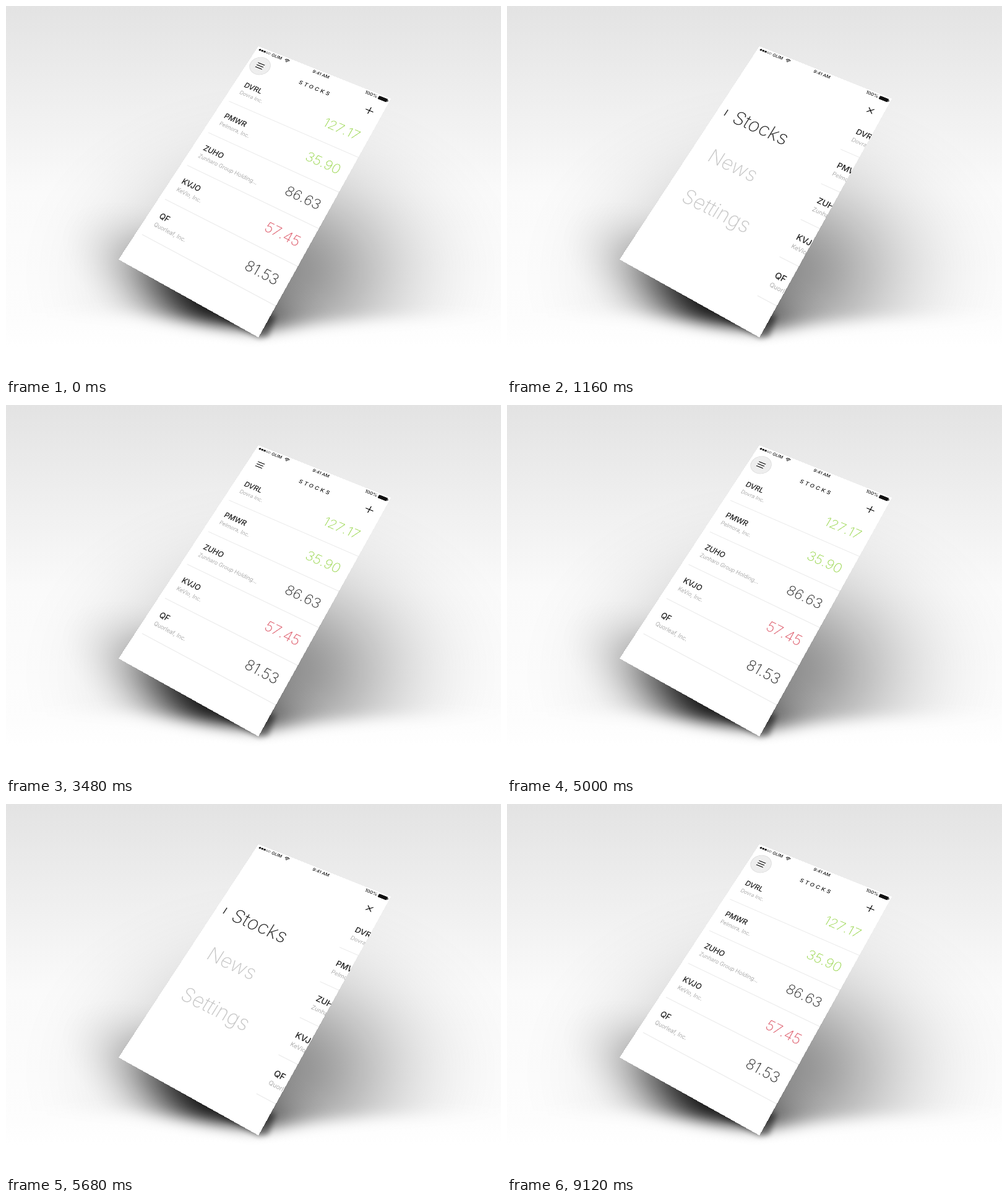
Write an HTML page that moves like this. It is 800x600 px and loops after 9200 ms.

```html
<!DOCTYPE html>
<html lang="en">
<head>
<meta charset="utf-8">
<title>Stocks menu</title>
<style>
  html, body { margin: 0; width: 100%; height: 100%; overflow: hidden; background: #fff; }
  #stage { position: relative; width: 800px; height: 600px; overflow: hidden; }
  #stage > svg { position: absolute; left: 0; top: 0; }
  #card { position: absolute; left: 0; top: 0; width: 375px; height: 667px; overflow: hidden;
          background: #fff; transform-origin: 0 0; }
  #card svg { display: block; font-family: Inter, "Open Sans", sans-serif; fill: #111; }
  .status { font-size: 12px; font-weight: 500; }
  .title { font-size: 15px; font-weight: 500; letter-spacing: 4.8px; }
  .ticker { font-size: 19.5px; font-weight: 500; fill: #1a1a1a; }
  .company { font-size: 14px; font-weight: 400; fill: #aaa; }
  .price { font-size: 34px; font-weight: 200; font-kerning: none; text-anchor: end; }
  .menu { font-size: 50px; font-weight: 200; }
  .rule { stroke: #e9e9e9; stroke-width: 1.5; }
  .icon { stroke: #111; stroke-width: 2; fill: none; }
  .press { fill: #eee; stroke: #dcdcdc; stroke-width: 1.5; }
</style>
</head>
<body>
<div id="stage">
  <svg width="800" height="600">
    <defs>
      <linearGradient id="wall" x2="0" y2="1">
        <stop offset="0" stop-color="#e3e3e3"/>
        <stop offset=".17" stop-color="#ebebeb"/>
        <stop offset=".33" stop-color="#f2f2f2"/>
        <stop offset=".5" stop-color="#fafafa"/>
        <stop offset=".86" stop-color="#fdfdfd"/>
        <stop offset=".92" stop-color="#fff"/>
      </linearGradient>
      <radialGradient id="blob"></radialGradient>
      <filter id="soft" x="-50%" y="-50%" width="200%" height="200%"><feGaussianBlur stdDeviation="11"/></filter>
      <filter id="crisp" x="-50%" y="-50%" width="200%" height="200%"><feGaussianBlur stdDeviation="4"/></filter>
      <mask id="floor" maskUnits="userSpaceOnUse" x="0" y="0" width="800" height="600">
        <path d="M-50 -50H850V498L600 506 500 514 408 527 300 514 200 500 -50 494Z" fill="#fff" filter="url(#soft)"/>
      </mask>
    </defs>
    <rect width="800" height="600" fill="url(#wall)"/>
    <g mask="url(#floor)" fill="url(#blob)">
      <ellipse cx="430" cy="430" rx="411" ry="309" opacity=".44"/>
      <ellipse rx="270" ry="114" opacity=".85" transform="translate(330 480) rotate(29)"/>
    </g>
    <path d="M340 502L409 537 424 534 436 500Z" opacity=".45" filter="url(#crisp)"/>
  </svg>

  <div id="card">
    <svg width="375" height="667">
      <g id="list"></g>
      <g id="menu" class="menu">
        <rect x="22.5" y="205" width="2.2" height="19"/>
        <text x="48" y="232" fill="#222">Stocks</text>
        <text x="48" y="353" fill="#c6c6c6">News</text>
        <text x="48" y="474" fill="#c6c6c6">Settings</text>
      </g>

      <circle id="menuPress" class="press" cx="34.5" cy="53" r="27"/>
      <g id="header">
        <path class="icon" d="M24.5 46h20m-20 7h20m-20 7h20"/>
        <text class="title" x="149" y="58.5">STOCKS</text>
      </g>
      <circle id="plusPress" class="press" cx="343" cy="53" r="27"/>
      <path id="plus" class="icon" d="M333 53h20m-10 -10v20"/>

      <g class="status">
        <g id="signal"></g>
        <text x="45" y="13">GLIM</text>
        <g fill="none" stroke="#111" stroke-width="1.8">
          <path d="M83.5 7.5Q90 1.5 96.5 7.5M86 10.2Q90 6.5 94 10.2"/>
        </g>
        <path d="M87.8 11.8Q90 10 92.2 11.8L90 14Z"/>
        <text x="188" y="13.5" text-anchor="middle">9:41 AM</text>
        <text x="343" y="13.5" text-anchor="end">100%</text>
        <rect x="346" y="4" width="23.5" height="10" rx="2"/>
        <rect x="370" y="7" width="2" height="4" rx="1"/>
      </g>
    </svg>
  </div>
</div>

<script>
const LOOP = 9200, WIDTH = 375, HEIGHT = 667;
const LIST_SHIFT = 311, MENU_SHIFT = 260;
const GREEN = '#98d64c', RED = '#dc5565', DARK = '#222';
const el = id => document.getElementById(id);

// Gaussian falloff that reaches three sigma at the rim.
el('blob').innerHTML = Array.from({ length: 21 }, (_, i) => {
  const r = i / 20, alpha = Math.exp(-4.5 * r * r) - r * Math.exp(-4.5);
  return `<stop offset="${r}" stop-opacity="${alpha.toFixed(4)}"/>`;
}).join('');

const stocks = [
  ['DVRL', 'Dovra Inc.', '127.17', GREEN],
  ['PMWR', 'Pelmora, Inc.', '35.90', GREEN],
  ['ZUHO', 'Zunharo Group Holding...', '86.63', DARK],
  ['KVJO', 'KeVio, Inc.', '57.45', RED],
  ['QF', 'Quorleaf, Inc.', '81.53', DARK],
];
el('list').innerHTML = stocks.map(([ticker, company, price, color], i) => {
  const y = 181 + 102 * i;
  return `<text class="ticker" x="27" y="${y - 54}">${ticker}</text>
    <text class="company" x="27" y="${y - 31}">${company}</text>
    <text class="price" x="352" y="${y - 39.5}" fill="${color}">${price}</text>
    <path class="rule" d="M15 ${y}H375"/>`;
}).join('');

el('signal').innerHTML = [0, 1, 2, 3, 4].map(i =>
  `<circle cx="${9.5 + 7 * i}" cy="8.5" r="2.6" stroke="#111" stroke-width=".8"
    fill="${i < 3 ? '#111' : 'none'}"/>`).join('');

// Perspective matrix that maps a w x h box to four corners (clockwise from top left).
function quadMatrix(w, h, [[x0, y0], [x1, y1], [x2, y2], [x3, y3]]) {
  const ax = x1 - x2, bx = x3 - x2, sx = x0 - x1 + x2 - x3;
  const ay = y1 - y2, by = y3 - y2, sy = y0 - y1 + y2 - y3;
  const det = ax * by - bx * ay;
  const g = (sx * by - sy * bx) / det, k = (ax * sy - ay * sx) / det;
  return `matrix3d(${[
    (x1 - x0 + g * x1) / w, (y1 - y0 + g * y1) / w, 0, g / w,
    (x3 - x0 + k * x3) / h, (y3 - y0 + k * y3) / h, 0, k / h,
    0, 0, 1, 0,
    x0, y0, 0, 1].map(n => n.toFixed(9))})`;
}
el('card').style.transform =
  quadMatrix(WIDTH, HEIGHT, [[408, 65], [622, 150], [408, 536], [182, 410]]);

const clamp = x => Math.min(1, Math.max(0, x));
const easeIn = x => clamp(x) ** 3;
const easeOut = x => 1 - (1 - clamp(x)) ** 3;
const pulse = (t, from, to, rise = 160) =>
  Math.min(clamp((t - from) / rise), clamp(1 - (t - to) / 160));

function draw(t) {
  const [openAt, closeAt] = t < 4400 ? [540, 2800] : [5000, 7320];
  const open = easeOut((t - openAt) / 660) - easeOut((t - closeAt - 200) / 440);
  const menuAway = 1 - easeOut((t - openAt - 350) / 280) + easeIn((t - closeAt) / 370);
  const wrapped = t > 8500 ? t - LOOP : t;

  el('list').setAttribute('transform', `translate(${LIST_SHIFT * open})`);
  el('menu').setAttribute('transform', `translate(${-MENU_SHIFT * menuAway})`);
  el('plus').setAttribute('transform', `rotate(${45 * open} 343 53)`);
  el('header').setAttribute('opacity', clamp((.6 - open) / .45));
  el('menuPress').setAttribute('opacity',
    Math.max(pulse(wrapped, -81, 560, 1), pulse(t, 4520, 5000)));
  el('plusPress').setAttribute('opacity', pulse(t, 2280, 2800));
}

function tick() {
  draw(performance.now() % LOOP);
  requestAnimationFrame(tick);
}
tick();
</script>
</body>
</html>
```
